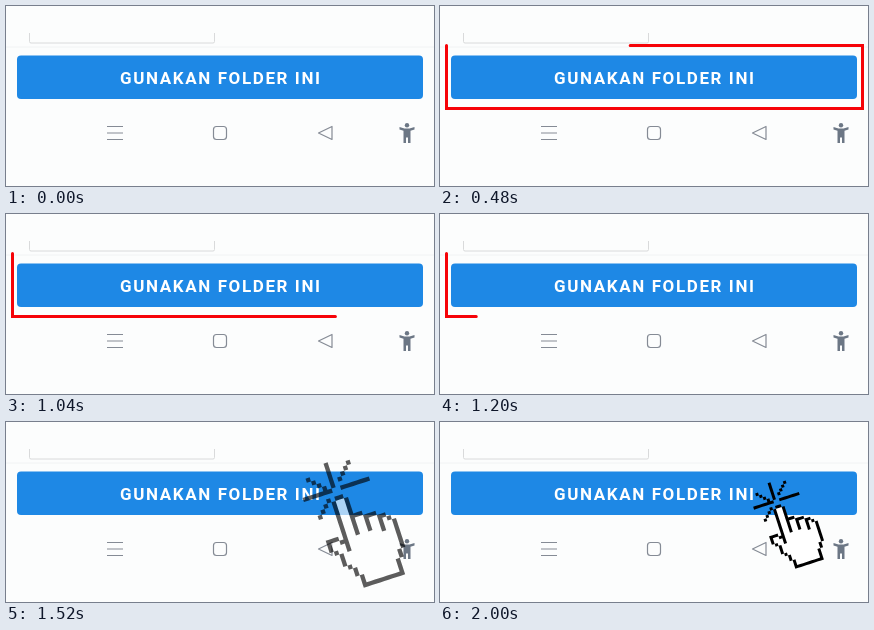
Animation, 428 px wide and 180 px high, one loop 2720 ms. Source, as an HTML page:

```html
<!DOCTYPE html>
<html lang="id">
<head>
<meta charset="utf-8">
<style>
  html, body { margin: 0; width: 100%; height: 100%; overflow: hidden; background: #fcfdfd; }
  svg { display: block; width: 428px; height: 180px; }
  text { font: 700 17px Roboto, Arial, sans-serif; letter-spacing: 1.6px; fill: #fff; }
</style>
</head>
<body>
<svg viewBox="0 0 428 180" fill="none">
  <path d="M0 41H428" stroke="#f1f3f4"/>
  <path d="M23.5 27V35.5Q23.5 37 25 37H207Q208.5 37 208.5 35.5V27" stroke="#d9dadb"/>
  <rect x="11" y="49.5" width="406" height="43.5" rx="4" fill="#1e88e5"/>
  <text x="114" y="78">GUNAKAN FOLDER INI</text>
  <g stroke="#858b95" stroke-width="1.2" stroke-linejoin="round">
    <path d="M101 120.5H117M101 127H117M101 133.5H117"/>
    <rect x="207.5" y="120.5" width="13" height="13" rx="3"/>
    <path d="M312.5 127L326 120.5V133.5Z"/>
  </g>
  <g fill="#6c7785">
    <circle cx="401" cy="119.2" r="2.2"/>
    <path d="M393.5 121L398.5 122.5H403.5L408.5 121V123.5L404.5 124.8V137H402V131.5H400V137H397.5V124.8L393.5 123.5Z"/>
  </g>
  <path id="frame" d="M6.5 39.5V102.5H422.5V39.5Z" pathLength="1" stroke="#f60308" stroke-width="3" stroke-linecap="round"/>
  <g id="hand">
    <g transform="translate(338.3 84.5) rotate(-18) scale(3) translate(-5.5 0)">
      <path id="skin" fill="#fff"/>
      <path id="ink" fill="#000"/>
    </g>
  </g>
</svg>
<script>
const el = id => document.getElementById(id);
const outline = "4,12 4,1 5,0 6,0 7,1 7,5 9,5 10,6 12,6 13,7 14,7 16,9 16,15 15,16 15,17 14,18 14,21 5,21 5,19 4,18 4,17 2,15 2,13 0,11 0,9 2,9 4,11";
const fingers = ["7,5 7,9", "10,6 10,9", "13,7 13,10"];
const rays = ["5,-3 5,-8", "7,-2 13,-2", "4,-2 -2,-2", "7,-4 10,-7", "3,-3 0,-6", "3,0 0,3"];

// Stamps unit blocks along a polyline.
function blocks(line) {
  const pts = line.split(" ").map(p => p.split(",").map(Number));
  let d = "";
  for (let i = 1; i < pts.length; i++) {
    const [x, y] = pts[i - 1], dx = pts[i][0] - x, dy = pts[i][1] - y;
    const n = Math.max(Math.abs(dx), Math.abs(dy));
    for (let k = 0; k <= n; k++)
      d += `M${x + Math.round(dx * k / n) - .5} ${y + Math.round(dy * k / n) - .5}h1v1h-1z`;
  }
  return d;
}
el("skin").setAttribute("d", `M${outline}Z`);
el("ink").setAttribute("d", [outline, ...fingers, ...rays].map(blocks).join(""));

const clamp = v => Math.min(1, Math.max(0, v));
const smooth = p => p * p * (3 - 2 * p);
const begin = performance.now();

function draw() {
  const elapsed = (performance.now() - begin) % 2720;
  const t = Math.min(2000, Math.floor(elapsed / 80) * 80);

  // The red border draws itself, then retracts.
  const len = smooth(clamp(t / 667)) - smooth(clamp((t - 667) / 660));
  el("frame").setAttribute("stroke-dasharray", `${len} 2`);
  el("frame").style.display = len > .001 ? "" : "none";

  // The hand fades in while shrinking to its resting size.
  const rest = clamp((2000 - t) / 754), scale = 1 + rest ** 1.77;
  el("hand").setAttribute("transform", `translate(350 104.5) scale(${scale}) translate(-350 -104.5)`);
  el("hand").setAttribute("opacity", 1 - rest ** 2.2);
  requestAnimationFrame(draw);
}
draw();
</script>
</body>
</html>
```
